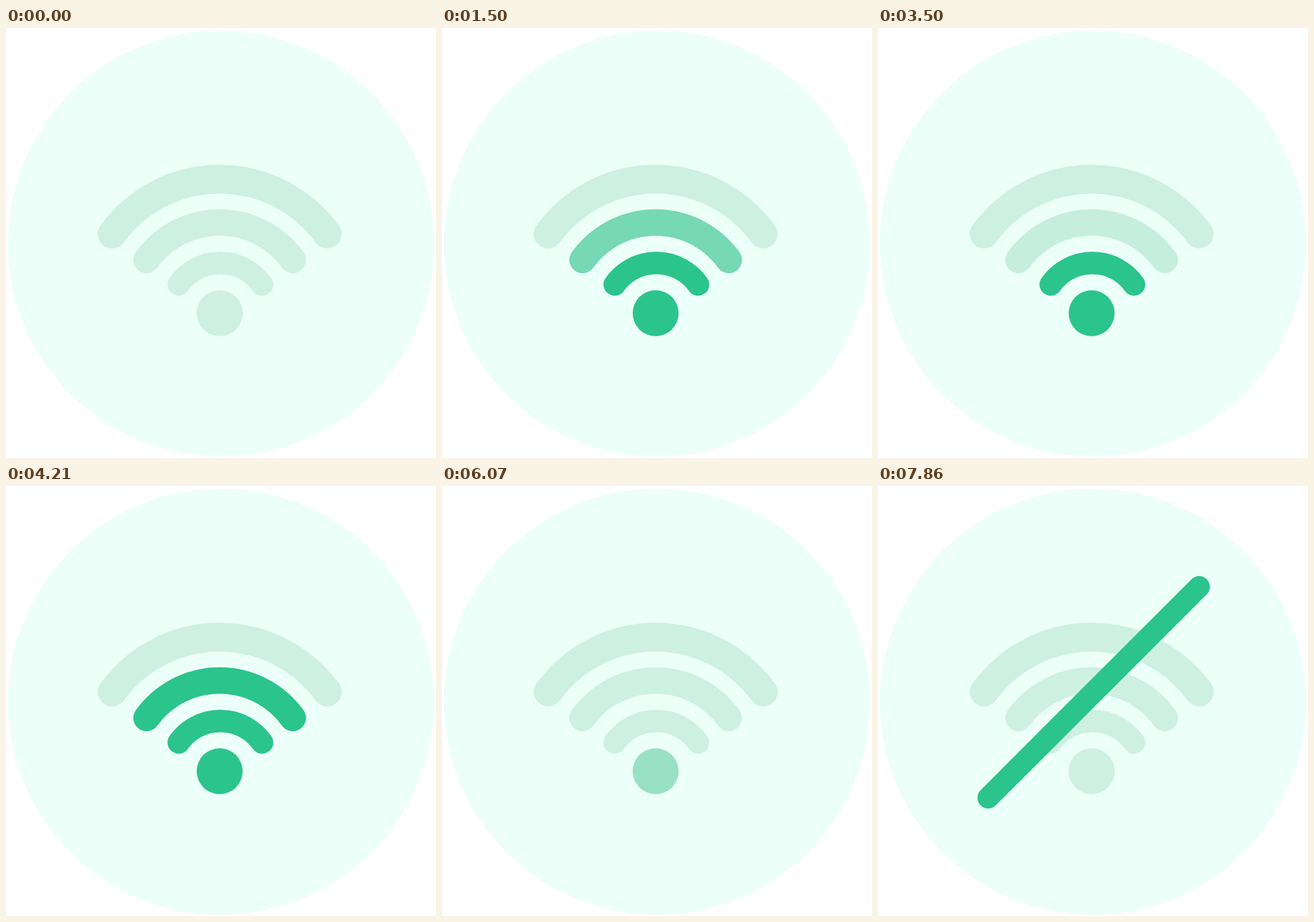
Recreate the animation shown at these times as an HTML page. Size 640 by 640 pixels, loop 8 s.

```html
<!DOCTYPE html>
<html lang="en">
<head>
<meta charset="utf-8">
<title>Signal lost</title>
<style>
  html, body { margin: 0; width: 100%; height: 100%; overflow: hidden; background: #fff; }
  svg { display: block; width: 100%; height: 100%; }
  .arc, #slash { fill: none; stroke-linecap: round; }
</style>
</head>
<body>
<svg viewBox="0 0 640 640">
  <circle cx="320" cy="321" r="317" fill="#ecfff8"/>
  <path class="arc" d="M158 306.5A197.8 197.8 0 0 1 478 306.5" stroke="#cef0e2" stroke-width="43"/>
  <path class="arc" id="middle" d="M209.2 345.2A134.1 134.1 0 0 1 426.8 345.2" stroke-width="39.5"/>
  <path class="arc" id="inner" d="M257 381.8A76.2 76.2 0 0 1 381.2 381.8" stroke-width="33.3"/>
  <circle id="dot" cx="318" cy="424.5" r="34.2"/>
  <path id="slash" stroke="#2bc48c" stroke-width="32"/>
</svg>
<script>
const FPS = 14, LOOP = 8000;
const DIM = [206, 240, 226], LIT = [43, 196, 140];
const LOW = 0.05;

// Tracks are [tick, level] pairs, with 14 ticks per second.
const rise = t => [[t, 0], [t + 1, 0.23], [t + 3, 0.54], [t + 5, 0.86], [t + 6, 0.97], [t + 7, 1]];
const fall = t => [[t, 1], [t + 1, 0.95], [t + 2, 0.8], [t + 5, 0.2], [t + 6, LOW]];
const fadeOut = t => [[t, 1], [t + 6, 0]];
const blink = t => [[t, 0], [t + 3, 1], [t + 6, 0]];
const rise2 = t => [[t, LOW], ...rise(t).slice(1)];

const tracks = {
  dot: [...rise(1), ...fadeOut(77), ...blink(84), ...blink(91)],
  inner: [...rise(9), ...fadeOut(76)],
  middle: [...rise(18), ...fall(26), ...rise2(35), ...fall(43), ...rise2(52), ...fadeOut(75)]
};

function level(track, tick) {
  const i = track.findIndex(p => p[0] > tick);
  if (i === 0) return track[0][1];
  if (i < 0) return track[track.length - 1][1];
  const [t0, v0] = track[i - 1], [t1, v1] = track[i];
  return v0 + (v1 - v0) * (tick - t0) / (t1 - t0);
}

const byId = id => document.getElementById(id);
const mix = k => `rgb(${DIM.map((c, i) => Math.round(c + (LIT[i] - c) * k)).join()})`;

function draw(ms) {
  const tick = Math.floor((ms + 4) * FPS / 1000);
  for (const id in tracks) {
    byId(id).setAttribute(id === "dot" ? "fill" : "stroke", mix(level(tracks[id], tick)));
  }
  const u = Math.min(1, Math.max(0, (tick - 98) / 12));
  const len = 314 * u * u * (3 - 2 * u);
  byId("slash").setAttribute("d", u ? `M478 150l${-len} ${len}` : "");
}

const start = performance.now();
function loop() {
  draw((performance.now() - start) % LOOP);
  requestAnimationFrame(loop);
}
loop();
</script>
</body>
</html>
```
